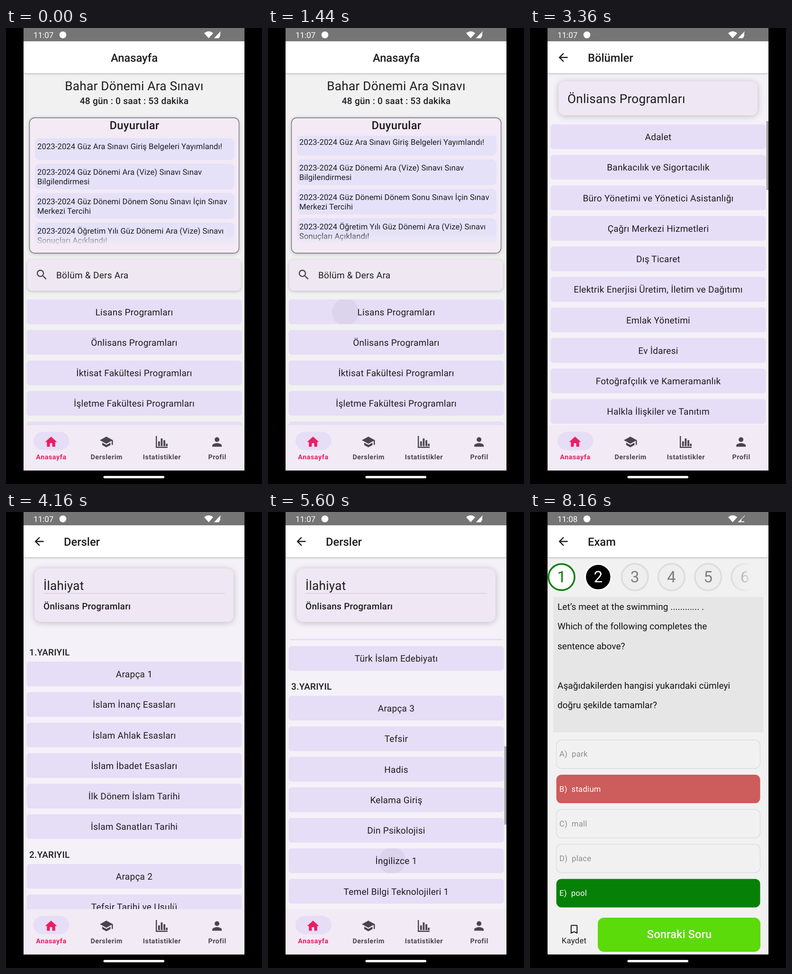
Write an HTML page with a canvas that moves like this. It is 540 px wide and 960 px high and loops after 8.32 s.

```html
<!DOCTYPE html>
<html lang="tr">
<head>
<meta charset="utf-8">
<style>
html, body { margin: 0; width: 100%; height: 100%; overflow: hidden; background: #000; }
canvas { display: block; width: 540px; height: 960px; }
</style>
</head>
<body>
<canvas id="stage" width="540" height="960"></canvas>
<script>
const g = document.getElementById('stage').getContext('2d');
const LOOP = 8320, STEP = 160, PITCH = 64.25, DP = 1.186;
const INK = '#1d1b20', ROW = '#e6ddf6', PAGE = '#f4f1f8', GREY = '#f1f1f1';

const ICONS = {
  home: 'M10 20v-6h4v6h5v-8h3L12 3 2 12h3v8z',
  school: 'M5 13.18v4L12 21l7-3.82v-4L12 17l-7-3.82zM12 3L1 9l11 6 9-4.91V17h2V9L12 3z',
  chart: 'M2 2h2v18h18v2H2zM6 11h3v8H6zM10.5 6h3v13h-3zM15 9h3v10h-3zM19 15h3v4h-3z',
  person: 'M12 12a4 4 0 1 0 0-8 4 4 0 0 0 0 8zm0 2c-2.67 0-8 1.34-8 4v2h16v-2c0-2.66-5.33-4-8-4z',
  search: 'M15.5 14h-.8l-.27-.27A6.5 6.5 0 1 0 13.73 14.43l.27.28v.79l5 4.99L20.49 19zm-6 0a4.5 4.5 0 1 1 0-9 4.5 4.5 0 0 1 0 9z',
  back: 'M20 11H7.83l5.59-5.59L12 4l-8 8 8 8 1.41-1.41L7.83 13H20z',
  mark: 'M17 3H7a2 2 0 0 0-2 2v16l7-3 7 3V5a2 2 0 0 0-2-2zm0 15l-5-2.18L7 18V5h10z'
};

const NEWS = [
  ['2023-2024 Güz Ara Sınavı Giriş Belgeleri Yayımlandı!'],
  ['2023-2024 Güz Dönemi Ara (Vize) Sınavı Sınav', 'Bilgilendirmesi'],
  ['2023-2024 Güz Dönemi Dönem Sonu Sınavı İçin Sınav', 'Merkezi Tercihi'],
  ['2023-2024 Öğretim Yılı Güz Dönemi Ara (Vize) Sınavı', 'Sonuçları Açıklandı!'],
  ['2023-2024 Güz Dönemi Dönem Sonu Sınavı Giriş', 'Belgeleri Yayımlandı!'],
  ['2023-2024 Güz Dönemi Dönem Sonu Sınavı Sınav', 'Bilgilendirmesi'],
  ['2023-2024 Öğretim Yılı Güz Dönemi Dönem Sonu', 'Sınavı Sonuçları Açıklandı!']
];
const GROUPS = ['Lisans Programları', 'Önlisans Programları', 'İktisat Fakültesi Programları',
  'İşletme Fakültesi Programları', ''];
const BACHELOR = ['Türk Dili ve Edebiyatı', 'Okulöncesi Öğretmenliği', 'İngilizce Öğretmenliği',
  'Felsefe', 'Tarih', 'Sosyoloji', 'Halkla İlişkiler ve Reklamcılık', 'Sağlık Yönetimi',
  'Sosyal Hizmet', 'Yönetim Bilişim Sistemleri'];
const ASSOCIATE = ['Adalet', 'Bankacılık ve Sigortacılık', 'Büro Yönetimi ve Yönetici Asistanlığı',
  'Çağrı Merkezi Hizmetleri', 'Dış Ticaret', 'Elektrik Enerjisi Üretim, İletim ve Dağıtımı',
  'Emlak Yönetimi', 'Ev İdaresi', 'Fotoğrafçılık ve Kameramanlık', 'Halkla İlişkiler ve Tanıtım',
  'İlahiyat', 'İşletme Yönetimi', 'Kültürel Miras ve Turizm', 'Lojistik', 'Marka İletişimi'];
const TERMS = [
  ['Arapça 1', 'İslam İnanç Esasları', 'İslam Ahlak Esasları', 'İslam İbadet Esasları',
    'İlk Dönem İslam Tarihi', 'İslam Sanatları Tarihi'],
  ['Arapça 2', 'Tefsir Tarihi ve Usulü', 'Hadis Tarihi ve Usulü', 'İslam Hukukuna Giriş',
    'İslam Kurumları ve Medeniyeti', 'Türk İslam Edebiyatı'],
  ['Arapça 3', 'Tefsir', 'Hadis', 'Kelama Giriş', 'Din Psikolojisi', 'İngilizce 1',
    'Temel Bilgi Teknolojileri 1', 'Türk Dili 1'],
  ['Arapça 4', 'Din Eğitimi', 'Din Sosyolojisi', 'İslam Felsefesi', 'Dinler Tarihi', 'İngilizce 2',
    'Temel Bilgi Teknolojileri 2', 'Türk Dili 2']
];
const QUIZ = [
  { lines: ['A: Are you ............ ?', 'B: No, I’m married.', 'Which of the following completes the',
      'dialogue above?', '', 'Aşağıdakilerden hangisi yukarıdaki', 'konuşmayı doğru şekilde tamamlar?'],
    options: ['single', 'new', 'one', 'different', 'first'],
    right: 0, pick: 0, picked: 6560, sent: 6880 },
  { lines: ['Let’s meet at the swimming ............ .', 'Which of the following completes the',
      'sentence above?', '', 'Aşağıdakilerden hangisi yukarıdaki cümleyi', 'doğru şekilde tamamlar?'],
    options: ['park', 'stadium', 'mall', 'place', 'pool'],
    right: 4, pick: 1, picked: 7680, sent: 8000 }
];
const NEXT_QUESTION = 7360, NEXT_MINUTE = 6880;
const TAPS = [[163, 598, 1280], [250, 662, 2880], [240, 612, 3840], [262, 734, 5440]];

// Eased value along a list of [time, value] steps
function track(t, steps) {
  let [t0, v0] = steps[0];
  for (const [t1, v1] of steps) {
    if (t < t1) {
      const k = Math.max(0, (t - t0) / (t1 - t0));
      return v0 + (v1 - v0) * k * k * (3 - 2 * k);
    }
    [t0, v0] = [t1, v1];
  }
  return v0;
}

function rect(x, y, w, h, color) {
  g.fillStyle = color;
  g.fillRect(x, y, w, h);
}

function box(x, y, w, h, r, fill, stroke, lift = 0) {
  g.save();
  g.beginPath();
  g.roundRect(x, y, w, h, r);
  if (lift) {
    g.shadowColor = 'rgba(0,0,0,.22)';
    g.shadowBlur = lift;
    g.shadowOffsetY = 1.5;
  }
  if (fill) { g.fillStyle = fill; g.fill(); }
  g.shadowColor = 'transparent';
  if (stroke) { g.strokeStyle = stroke; g.lineWidth = 1.3; g.stroke(); }
  g.restore();
}

function disc(x, y, r, fill, stroke, width) {
  g.beginPath();
  g.arc(x, y, r, 0, 7);
  if (fill) { g.fillStyle = fill; g.fill(); }
  if (stroke) { g.strokeStyle = stroke; g.lineWidth = width; g.stroke(); }
}

// Text centred vertically on y; sp is the size in device units
function text(s, x, y, sp, { align = 'left', weight = 400, color = INK, gap = .25 } = {}) {
  const size = sp * DP;
  g.font = `${weight} ${size}px Roboto, sans-serif`;
  g.letterSpacing = gap * DP + 'px';
  g.textRendering = 'geometricPrecision';
  g.textAlign = align;
  g.fillStyle = color;
  g.fillText(s, x, y + size * .345);
}

function icon(name, x, y, color, size = 28.5) {
  g.save();
  g.translate(x - size / 2, y - size / 2);
  g.scale(size / 24, size / 24);
  g.fillStyle = color;
  g.fill(new Path2D(ICONS[name]), 'evenodd');
  g.restore();
}

function clip(x, y, w, h, draw) {
  g.save();
  g.beginPath();
  g.rect(x, y, w, h);
  g.clip();
  draw();
  g.restore();
}

function fade(x, y, w, h, from, to, across) {
  const f = across ? g.createLinearGradient(x, 0, x + w, 0) : g.createLinearGradient(0, y, 0, y + h);
  f.addColorStop(0, from);
  f.addColorStop(1, to);
  rect(x, y, w, h, f);
}

function row(name, y, t) {
  box(43.5, y, 454, 52, 6, ROW);
  for (const [px, py, start] of TAPS) {
    if (t < start || t >= start + 2 * STEP || py < y || py > y + 52) continue;
    clip(43.5, y, 454, 52, () => disc(px, py, 15 + (t - start) / 12, 'rgba(60,50,70,.055)'));
  }
  text(name, 270.5, y + 26.5, 16, { align: 'center' });
}

function scrollbar(top, len, offset, total) {
  const view = 836 - top;
  rect(498.5, top + offset * view / total, 4.5, len, '#a3a1a6');
}

function appBar(title, back) {
  g.save();
  g.shadowColor = 'rgba(0,0,0,.3)';
  g.shadowBlur = 4;
  g.shadowOffsetY = 1;
  rect(37, 28, 466, 67, '#fff');
  g.restore();
  if (back) icon('back', 70, 62, INK);
  text(title, back ? 122 : 270.5, 62.6, 20, { align: back ? 'left' : 'center', weight: 500, gap: 0 });
}

function navBar() {
  rect(37, 836, 466, 95.5, '#f2eaf5');
  box(58, 850.5, 75.5, 38, 19, ROW);
  [['home', 'Anasayfa'], ['school', 'Derslerim'], ['chart', 'Istatistikler'], ['person', 'Profil']]
    .forEach(([name, label], i) => {
      const x = 95 + i * 116.7, color = i ? '#49454f' : '#e91e63';
      icon(name, x, 871.5, color, 30);
      text(label, x + .5, 903.5, 12, { align: 'center', weight: 600, color, gap: .5 });
    });
}

function news(t) {
  let y = 232 - track(t, [[160, 0], [640, 180], [1280, 9]]);
  clip(51, 227, 438, 235, () => {
    for (const lines of NEWS) {
      const h = lines.length > 1 ? 54 : 46;
      box(61, y, 421, h, 10, '#e4e1f8');
      lines.forEach((s, i) => text(s, 66, y + 17.5 + i * 20.2, 14, { gap: .1 }));
      y += h + 7.8;
    }
  });
  fade(51, 430, 438, 28, 'rgba(243,234,246,0)', '#f3eaf6');
  rect(51, 458, 438, 5, '#f3eaf6');
}

function home(t) {
  rect(37, 28, 466, 904, GREY);
  text('Bahar Dönemi Ara Sınavı', 270.5, 121.7, 22, { align: 'center' });
  text('48 gün : 0 saat : 53 dakika', 270.5, 153.7, 16, { align: 'center', weight: 500 });

  box(49.5, 189, 442, 285, 11, '#f3eaf6', '#716d78', 8);
  text('Duyurular', 271, 204.7, 20, { align: 'center', weight: 500 });
  news(t);

  box(45, 488, 450.5, 65, 9, '#efe8f3', null, 6);
  icon('search', 75.5, 519.5, '#49454f');
  text('Bölüm & Ders Ara', 106, 520, 16);
  GROUPS.forEach((name, i) => row(name, 571.5 + i * PITCH, t));
  appBar('Anasayfa');
  navBar();
}

function programs(t, title, names, offset, bar) {
  rect(37, 28, 466, 904, PAGE);
  box(60, 112, 420, 72, 14, '#efe7f3', null, 14);
  text(title, 79, 148.5, 22);
  clip(37, 196, 466, 640, () => {
    names.forEach((name, i) => row(name, 203 + i * PITCH - offset, t));
    if (bar) scrollbar(196, 145, offset, 2825);
  });
  appBar('Bölümler', true);
  navBar();
}

const bachelor = t => programs(t, GROUPS[0], BACHELOR, 0, false);
const associate = t => programs(t, GROUPS[1], ASSOCIATE,
  track(t, [[3360, 0], [3840, 260]]), t >= 3360);

function courses(t) {
  const offset = track(t, [[4160, 0], [4640, 321], [5280, 780]]);
  rect(37, 28, 466, 904, PAGE);
  box(60, 119, 420, 112.5, 14, '#efe7f3', null, 14);
  text('İlahiyat', 79, 154.5, 22);
  rect(80, 170.8, 381.5, 1, '#cbc5d0');
  text(GROUPS[1], 79, 198.5, 16, { weight: 500 });
  clip(37, 267, 466, 569, () => {
    let y = 295 - offset;
    TERMS.forEach((names, n) => {
      text(`${n + 1}.YARIYIL`, 49, y, 16, { weight: 500 });
      names.forEach((name, i) => row(name, y + 20 + i * PITCH, t));
      y += 40.5 + names.length * PITCH;
    });
    if (t > 4160) scrollbar(267, 165, offset, 1962);
  });
  appBar('Dersler', true);
  navBar();
}

function exam(t) {
  const n = t < NEXT_QUESTION ? 0 : 1, q = QUIZ[n], sent = t >= q.sent;
  rect(37, 28, 466, 904, GREY);
  clip(37, 96, 433, 82, () => {
    for (let i = 0; i < 6; i++) {
      const x = 66.5 + i * 77.3;
      let color = '#7d7d7d';
      if (i === n) {
        disc(x, 137, 27.5, '#000', '#fff', 3.5);
        color = '#fff';
      } else if (i < n) {
        disc(x, 137, 27.5, '#fff', color = '#0b800b', 3.5);
      } else {
        disc(x, 137, 28, '#eeeeee', '#dddddd', 3.5);
      }
      text(i + 1, x, 137, 28, { align: 'center', color, gap: 0 });
    }
    fade(425, 100, 45, 76, 'rgba(241,241,241,0)', GREY, true);
  });

  rect(49, 179, 443, 285, '#e6e6e6');
  q.lines.forEach((s, i) => text(s, 58, 199.2 + i * 41.5, 16, { gap: .06, color: '#111' }));

  q.options.forEach((s, i) => {
    const y = 480 + i * 73.1;
    let fill = null, color = sent ? '#8c8c8c' : INK;
    if (sent && i === q.right) fill = '#078007';
    else if (i === q.pick && t >= q.picked) fill = sent ? '#cd5c5c' : '#7b7b7b';
    if (fill) color = '#fff';
    box(55.5, y, 430, 60, 11, fill, fill ? null : '#dcdcdc');
    text(`${'ABCDE'[i]})  ${s}`, 62, y + 29.7, 14, { color });
  });

  icon('mark', 93, 878.5, INK, 25);
  text('Kaydet', 93, 902.7, 14, { align: 'center' });
  box(143, 854, 343, 72, 13, sent ? '#5bdb0a' : '#dcb30a');
  text(sent ? 'Sonraki Soru' : 'Cevapla', 315, 888.7, 20,
    { align: 'center', weight: 500, color: '#fbfbf0', gap: .05 });
  appBar('Exam', true);
}

function shape(color, ...points) {
  g.beginPath();
  points.forEach(([x, y]) => g.lineTo(x, y));
  g.closePath();
  g.fillStyle = color;
  g.fill();
}

function statusBar(t) {
  rect(37, 0, 466, 28, '#757575');
  text(t < NEXT_MINUTE ? '11:07' : '11:08', 58, 15, 14.3, { color: '#fff', gap: 0 });
  disc(120, 14.5, 7.3, '#fff');
  g.beginPath();
  g.moveTo(418, 11);
  g.quadraticCurveTo(427.5, 3, 437, 11);
  g.lineTo(427.5, 21.5);
  g.closePath();
  g.fillStyle = '#fff';
  g.fill();
  shape('#fff', [438.5, 21.5], [453, 7], [453, 8.5], [446, 15.5], [446, 21.5]);
  if (t < 5760) shape('#fff', [445, 15], [452, 8], [452, 16], [449, 21.5], [445, 21.5]);
  else rect(447, 19.5, 5, 2, '#fff');
}

const SCREENS = [[0, home], [1600, bachelor], [2720, home], [3040, associate],
  [4000, courses], [5760, exam]];

function draw(t) {
  rect(0, 0, 540, 960, '#000');
  const at = SCREENS.findLastIndex(([start]) => t >= start);
  const [start, screen] = SCREENS[at];
  clip(37, 28, 466, 903.5, () => {
    if (at && t < start + STEP) {
      SCREENS[at - 1][1](t);
      g.globalAlpha = .7;
    }
    screen(t);
    g.globalAlpha = 1;
  });
  statusBar(t);
  box(205.5, 943, 128.5, 5, 2.5, '#fff');
}

function tick() {
  draw(Math.floor(performance.now() % LOOP / STEP) * STEP);
  requestAnimationFrame(tick);
}
tick();
</script>
</body>
</html>
```
